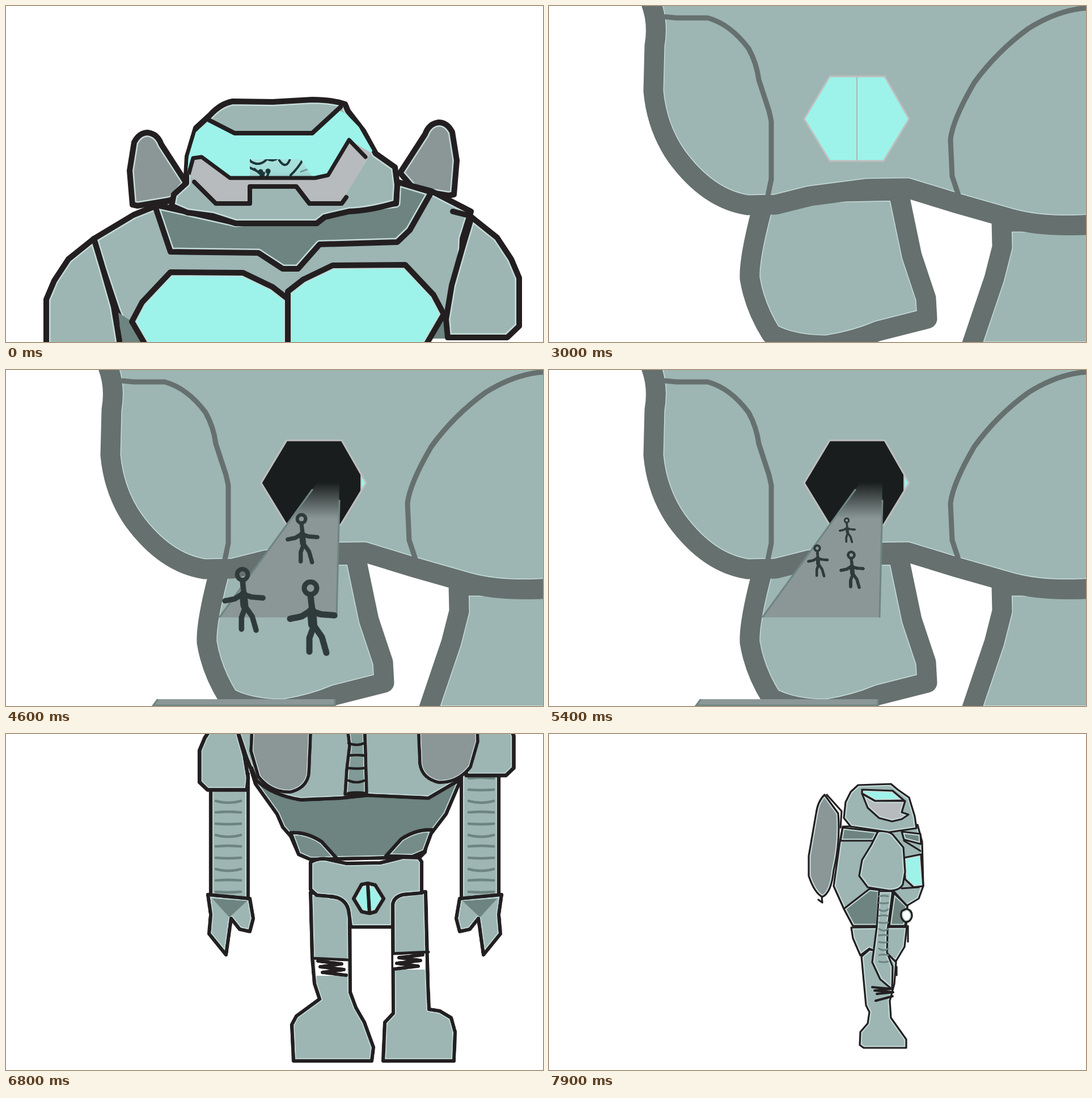
These frames come from a looping animation (947x592 px, 8 s). An HTML page:

```html
<!DOCTYPE html>
<html lang="en">
<head>
<meta charset="utf-8">
<title>Robot trip</title>
<style>
html, body { margin: 0; width: 100%; height: 100%; overflow: hidden; background: #fff; }
svg { display: block; width: 100vw; height: 100vh; }
path { stroke-linejoin: round; stroke-linecap: round; }
.cut { animation: 8s step-end infinite; }

#head { animation-name: head; }
#hello { animation-name: hello; font: 44px "Open Sans", "Noto Sans", sans-serif;
  fill: #6d8480; stroke: #6d8480; stroke-width: .5; }
#close { animation-name: close; }
#back { animation-name: back; }
#turn { animation-name: turn; }
#side { animation-name: side; }
#zoom { animation-name: zoom; }
#ramp { animation-name: ramp; transform-origin: 570px 198px; }
#plate { animation-name: plate; }
#doorL { --slide: -96px; animation-name: door; }
#doorR { --slide: 83px; animation-name: door; }
#lid { --slide: -97px; animation-name: part; }
#jaw { --slide: 112px; animation-name: part; }
#crew { animation: crew 8s infinite, crewShow 8s step-end infinite; }

@keyframes head { 0% { opacity: 1 } 37.5%, 100% { opacity: 0 } }
@keyframes hello { 0% { opacity: 0 } 18.75% { opacity: 1 } 37.5%, 100% { opacity: 0 } }
@keyframes close { 0% { opacity: 0 } 37.5% { opacity: 1 } 80%, 100% { opacity: 0 } }
@keyframes back { 0% { opacity: 1 } 96.25%, 100% { opacity: 0 } }
@keyframes turn { 0% { opacity: 0 } 96.25%, 100% { opacity: 1 } }
@keyframes side { 0% { opacity: 0 } 98.75%, 100% { opacity: 1 } }
@keyframes zoom {
  0% { opacity: 0; transform: none }
  80% { opacity: 1; transform: translate(-466px, -244px) scale(1.735) }
  82.5% { opacity: 1; transform: translate(-216px, -114px) scale(1.34) }
  85% { opacity: 1; transform: none }
  87.5% { opacity: 1; transform: translate(121px, 90px) scale(.82) }
  90% { opacity: 1; transform: translate(214px, 166px) scale(.683) }
  98.75%, 100% { opacity: 0; transform: none }
}
@keyframes part {
  0% { transform: translateY(0); animation-timing-function: steps(6, end) }
  15%, 100% { transform: translateY(var(--slide)) }
}
@keyframes door {
  0%, 77.5%, 100% { transform: translateX(0) }
  40%, 75% { transform: translateX(calc(var(--slide) / 2)) }
  42.5% { transform: translateX(var(--slide)) }
}
@keyframes ramp {
  0%, 75%, 100% { transform: scale(0) }
  45%, 72.5% { transform: scale(.5) }
  47.5% { transform: scale(1) }
}
@keyframes plate { 0% { opacity: 0 } 47.5% { opacity: 1 } 72.5%, 100% { opacity: 0 } }
@keyframes crew {
  0%, 50% { transform: translate(-925.75px, -468.5px) scale(2.75); animation-timing-function: steps(7, end) }
  67.5% { transform: translate(0px, 0px) scale(1); animation-timing-function: step-end }
  70%, 100% { transform: translate(132px, 67px) scale(.75) }
}
@keyframes crewShow { 0% { opacity: 0 } 50% { opacity: 1 } 72.5%, 100% { opacity: 0 } }
</style>
</head>
<body>
<svg viewBox="0 0 947 592" preserveAspectRatio="none">
  <defs>
    <linearGradient id="cabin" gradientUnits="userSpaceOnUse" x1="0" y1="185" x2="0" y2="348">
      <stop offset="0" stop-color="#7fa3a1"/><stop offset=".2" stop-color="#86adab"/>
      <stop offset=".45" stop-color="#abe3df"/><stop offset=".66" stop-color="#a2dcd8"/>
      <stop offset=".82" stop-color="#7fafad"/><stop offset="1" stop-color="#a4e8e2"/>
    </linearGradient>
    <linearGradient id="slope" gradientUnits="userSpaceOnUse" x1="0" y1="198" x2="0" y2="262">
      <stop offset="0" stop-color="#191d1d"/><stop offset="1" stop-color="#8b9797"/>
    </linearGradient>
    <clipPath id="visor"><path d="M358,203 403,226 540,226 585,183 600,190 622,213 646,255 590,348 535,348 514,318 428,318 426,348 370,348 333,308 320,292 322,265 335,222Z"/></clipPath>
    <clipPath id="gap"><path d="M430,270H520L540,301 430,312Z"/></clipPath>
    <path id="hex" d="M450,199 495,124H592L635,199 590,273H495Z"/>
    <clipPath id="hexClip"><use href="#hex"/></clipPath>
    <g id="man" fill="none" stroke="#2f3b3a" stroke-width="5.5">
      <circle r="5.5" stroke-width="4.5"/>
      <path d="M0,6 3,33M-18,27 -8,25 0,20 9,23 21,24M3,33 -1,44 -1,56M3,33 10,43 14,57"/>
      <path d="M1,20 2,32" stroke-width="8"/>
    </g>
    <g id="pilot" fill="none" stroke="#1c3536" stroke-width="4">
      <rect x="310" y="175" width="345" height="180" fill="url(#cabin)" stroke="none"/>
      <path stroke="#3d6263" stroke-width="3" opacity=".5" d="M338,232q18,-12 34,-8M332,245q18,4 32,-8M335,258q16,4 30,-8M345,280q45,-5 62,16M345,298q25,-14 70,-4M352,308q30,14 65,0M358,322q20,-14 32,-18M555,222q8,8 -8,16M545,250q14,0 14,-10M520,292q30,-12 55,-8M528,304q32,-10 48,-8M535,316q18,10 42,8M575,235l55,8 -2,24 -35,8 -15,-8ZM586,265q6,-22 14,-4q8,-12 10,2q8,-6 14,-2M562,285h48M566,294h42M576,298l8,-14M590,300l8,-14M602,298l6,-14"/>
      <path d="M451,247Q450,271 470,272 489,268 488,247M449,254Q444,232 470,231 493,230 493,253M453,240Q460,234 470,239 482,243 490,237"/>
      <path stroke-width="2.5" d="M462,251v2M476,251v2M464,259q5,2 10,0q-4,8 -10,0"/>
      <path d="M445,292Q410,276 391,260 383,246 400,249 413,245 419,258L432,274Q446,283 458,272M482,272Q493,288 500,272L507,246Q515,233 528,236 540,242 530,257 521,280 502,298V316M438,287 452,299M440,309 455,294 451,308M458,306 464,292"/>
      <path stroke-width="9" d="M449,292h.1M462,291h.1"/>
    </g>
    <path id="lidShape" fill="#9df3ea" d="M300,60H680L650,258 637,268 605,238 568,298 545,303H395L345,266 315,290Z"/>
    <g id="jawShape">
      <path fill="#b8bbbd" d="M320,300 330,268 345,266 395,303H545L568,298 605,236 650,262V360H320Z"/>
      <path fill="none" stroke="#231f20" stroke-width="7" d="M322,297 330,268 345,266 395,303H545L568,298 605,236 634,266"/>
    </g>
    <path id="frame" fill="none" stroke="#231f20" stroke-width="8" d="M358,201 403,224H540L590,178M332,310 370,348H430V318H512L535,348H592L600,337"/>
    <g id="lower"></g>
    <g id="trunk"></g>
    <g id="chest"></g>
    <g id="top"></g>
  </defs>

  <rect width="947" height="592" fill="#fff"/>

  <g id="head" class="cut">
    <use href="#trunk"/><use href="#chest"/><use href="#top"/>
    <g clip-path="url(#visor)">
      <use href="#pilot"/>
      <g id="lid" class="cut"><use href="#lidShape"/></g>
      <use href="#pilot" clip-path="url(#gap)"/>
      <g id="jaw" class="cut"><use href="#jawShape"/></g>
    </g>
    <use href="#frame"/>
  </g>
  <text id="hello" class="cut" x="136" y="98">HeLLO!Let’s go to MARS!!!!</text>

  <g id="close" class="cut">
    <g id="hull"></g>
    <use href="#hex" fill="#191d1d"/>
    <g clip-path="url(#hexClip)" fill="#9df3ea" stroke="#b5b3b3" stroke-width="2">
      <path id="doorL" class="cut" d="M440,110H543V290H440Z"/>
      <path id="doorR" class="cut" d="M543,110H650V290H543Z"/>
    </g>
    <use href="#hex" fill="none" stroke="#c0bebe" stroke-width="3"/>
    <g id="plate" class="cut">
      <path fill="#8b9797" d="M267,580H581V592H258Z"/>
      <path fill="none" stroke="#6f8582" stroke-width="3" d="M267,581 258,593M580,581V592M262,591H580"/>
    </g>
    <g id="ramp" class="cut">
      <path fill="url(#slope)" d="M549,198H588L584,436H376Z"/>
      <path fill="none" stroke="#6f8582" stroke-width="3" d="M540,211 377,435M588,230 583,435"/>
    </g>
    <g id="crew">
      <use href="#man" transform="translate(525,265) scale(.67)"/>
      <use href="#man" transform="translate(473,314) scale(.86)"/>
      <use href="#man" transform="translate(533,326)"/>
    </g>
  </g>

  <g id="zoom" class="cut">
    <use href="#lower"/>
    <g id="back" class="cut">
      <g transform="translate(294.1,-315) scale(.6645)"><use href="#trunk"/><use href="#top"/></g>
      <g id="wings"></g>
    </g>
    <g id="turn" class="cut">
      <g transform="translate(294.1,-315) scale(.6645)">
        <use href="#trunk"/><use href="#chest"/><use href="#top"/>
        <g clip-path="url(#visor)"><use href="#lidShape"/><use href="#jawShape"/></g>
        <use href="#frame"/>
      </g>
    </g>
  </g>

  <g id="side" class="cut"></g>
</svg>
<script>
const BODY = '#9db6b3', DARK = '#6d8480', CYAN = '#9df3ea', GRAY = '#8b9697', INK = '#231f20', NONE = 'none';
let clips = 0;

// A part is [path, fill, line colour, line width, transform]; filled parts get a pale inner rim.
function art(id, width, rim, ink, parts) {
  document.getElementById(id).innerHTML = parts.map(([d, fill = NONE, line = ink, w = width, move = '']) => {
    const clip = 'rim' + clips++;
    const inside = fill === NONE ? '' : `<path d="${d}" fill="${fill}"/>`;
    const pale = !inside || line === NONE ? '' : `<clipPath id="${clip}"><path d="${d}"/></clipPath>
      <path d="${d}" clip-path="url(#${clip})" fill="none" stroke="#c6dcda" stroke-width="${w + rim}"/>`;
    return `<g transform="${move}">${inside}${pale}<path d="${d}" fill="none" stroke="${line}" stroke-width="${w}"/></g>`;
  }).join('');
}

// Each part followed by its mirror image: x becomes sum - x, y becomes y + dy.
const pair = (sum, dy, ...parts) => parts.flatMap(([d, fill, line, w]) =>
  [[d, fill, line, w], [d, fill, line, w, `translate(${sum},${dy}) scale(-1,1)`]]);

// A ladder of short wavy strokes.
const ribs = (x, y, w, gap, n) =>
  Array.from({ length: n }, (_, i) => `M${x},${y + i * gap}q${w / 2},${i % 3 * 4 - 2} ${w},0`).join('');

// A zigzag scribble of n strokes.
const scribble = (x, y, w, gap, n) =>
  `M${x},${y}` + Array.from({ length: n }, (_, i) => `l${i % 2 ? -w + 4 : w},${gap}`).join('');

art('trunk', 10, 5, INK, [
  ...pair(1013, -18, ['M223,350 218,290 226,240Q235,223 250,223 267,225 274,244L318,312 292,342 232,352Z', GRAY]),
  ['M205,560 195,535 170,460 155,410 225,368 290,342 690,310 750,326 820,362 805,410 800,520 797,560', BODY]
]);

art('chest', 10, 4, INK, [
  ...pair(998, -14, ['M198,540 222,556 250,600 205,600Z', DARK, NONE]),
  ...pair(994, -13, ['M290,469 418,470 470,495 497,516V625H262L222,556 240,522Z', CYAN])
]);

art('top', 10, 5, INK, [
  ['M262,350 290,433 445,435 488,463 515,463 553,420 690,416 712,395 750,328 690,310 688,348 405,382Z', DARK],
  ...pair(976, -38, ['M155,410 110,446 85,484 71,517V602L92,622H197L200,590 190,530 170,460Z', BODY]),
  ['M812,368 788,362'],
  ['M318,300 320,265 335,215 360,192Q378,172 400,168L470,169 540,165Q575,165 598,173L603,185 630,220 652,260 686,284 690,315 688,347Q640,361 605,362L562,372 548,383H405L365,370 320,364 292,352 296,332 318,312Z', BODY]
]);

art('lower', 6.2, 3.5, INK, [
  ['M425,40 440,88 478,141 488,164 502,180 516,212 537,221 730,217 739,208 742,188 750,175 776,141 800,85 825,50Z', DARK],
  ['M412,-20 427,45 442,82Q470,108 520,116L590,113 638,108 745,113 798,82 828,40 840,-20', BODY],
  ...pair(1254, -5, ['M502,174 516,212 537,221 584,220 557,190Q530,172 502,174', '#758c88']),
  ...pair(1230, 0,
    ['M361,70H427V292H361Z', BODY],
    [ribs(370, 78, 44, 20, 11), NONE, DARK, 4.5],
    ['M356,283 361,318 358,352 388,389 397,325 412,344 430,348 436,325 430,290Z', BODY],
    ['M364,290 425,294 394,323Z', DARK, NONE]),
  ['M537,279 540,394 544,440 553,467 512,497 504,512 507,576H645L648,552 632,508 617,482 607,455 606,310Q600,288 575,287Z', BODY],
  ['M682,300Q684,286 700,283L740,278 744,440 746,485 765,488 785,500 792,525 790,576H665L668,508 683,492Z', BODY],
  ['M537,226Q555,216 572,222L600,228 660,227 700,217 728,218 733,225V280L700,283Q684,287 682,300V340H608L604,310Q598,287 570,286L548,284 537,274Z', BODY],
  ['M627,265 613,290 627,313 641,316 652,313 666,290 651,266 638,263Z', CYAN],
  ['M638,266 641,315'],
  ...pair(1285, -11,
    ['M546,398H602V426H546Z', '#fff', NONE],
    [scribble(550, 400, 42, 5, 5), NONE, INK, 6],
    ['M540,395 602,398', NONE, INK, 5])
]);

art('wings', 5.5, 3, INK, [
  ...pair(1264, -17, ['M458,-167Q440,-150 438,-100L432,30 445,75Q468,104 502,102 530,95 534,70L537,0 522,-95 478,-155Z', GRAY]),
  ['M598,-40 606,20 601,62 598,106 636,108 633,0 632,-40', '#809a97'],
  [ribs(604, -28, 28, 22, 7), NONE, INK, 4.5]
]);

art('hull', 35, 3, '#66706e', [
  ['M383,330Q352,440 354,480 362,530 392,578 430,598 490,598 540,590 580,573L667,551 665,515 640,440 616,325Z', BODY],
  ['M960,610H741L785,480 799,425 798,380H960', BODY],
  ['M180,-5Q193,30 186,70L184,150Q190,215 225,265 280,340 350,351L400,350 460,335 560,322 632,321 720,348 815,375Q880,393 985,383V-60H180Z', BODY],
  ['M205,19 225,21H280Q320,32 352,75 366,100 370,130L388,185 392,203V305L386,334', NONE, undefined, 9],
  ['M955,3Q900,5 845,40 790,80 750,135 712,200 708,235L711,300 722,333', NONE, undefined, 9]
]);

art('side', 3.2, 4, INK, [
  ['M490,107 516,136 514,165M475,292 482,297 481,288'],
  ['M486,107Q474,118 471,140L458,215V250Q468,280 482,287 498,280 502,240 514,190 510,140Z', GRAY],
  ['M518,163 513,190 502,268 520,308 536,338H630L632,302 652,290 660,268 658,190 650,160Z', BODY],
  ['M518,165 514,188H572L580,172Z', DARK],
  ['M622,172 655,176 656,194 626,186Z', DARK],
  ['M520,308 565,273 583,275 580,338H536Z', DARK],
  ['M608,280 632,303 628,338H600Z', DARK],
  ['M533,341 536,360 549,390 565,378 612,400 627,375 631,340Z', BODY],
  ['M565,380 551,392 559,478 565,490 562,510 549,525 548,548 555,553H630V538L603,500 601,470 609,440 612,402 595,385Z', BODY],
  ['M582,277H606L597,345 596,385 606,410 605,450 584,432 570,402 578,340Z', BODY],
  [ribs(582, 286, 16, 11.5, 11), NONE, DARK, 3],
  [scribble(570, 446, 33, 3, 4) + 'M606,462 576,470', NONE, INK, 4],
  ['M613,410V425M633,338V366'],
  ['M626,218 656,212 660,268 643,270 628,256Z', CYAN],
  ['M626,188 655,206M622,272 652,270M608,277 630,302'],
  ['M630,308Q641,310 640,322 636,334 626,330 618,322 622,312Z', '#fff'],
  ['M580,172Q595,168 606,177L625,200 628,243 624,265Q618,276 600,276L562,270 547,250 552,222 568,196Z', BODY],
  ['M545,90 603,88 615,98 635,112 645,145 648,166 600,173 532,163 520,148 523,120 532,102Z', BODY],
  ['M552,98 606,100 626,117 575,118 552,105Z', CYAN],
  ['M552,105 575,118H628L622,138 634,142 622,150 605,154 582,148 562,130Z', '#b8bbbd']
]);
</script>
</body>
</html>
```
